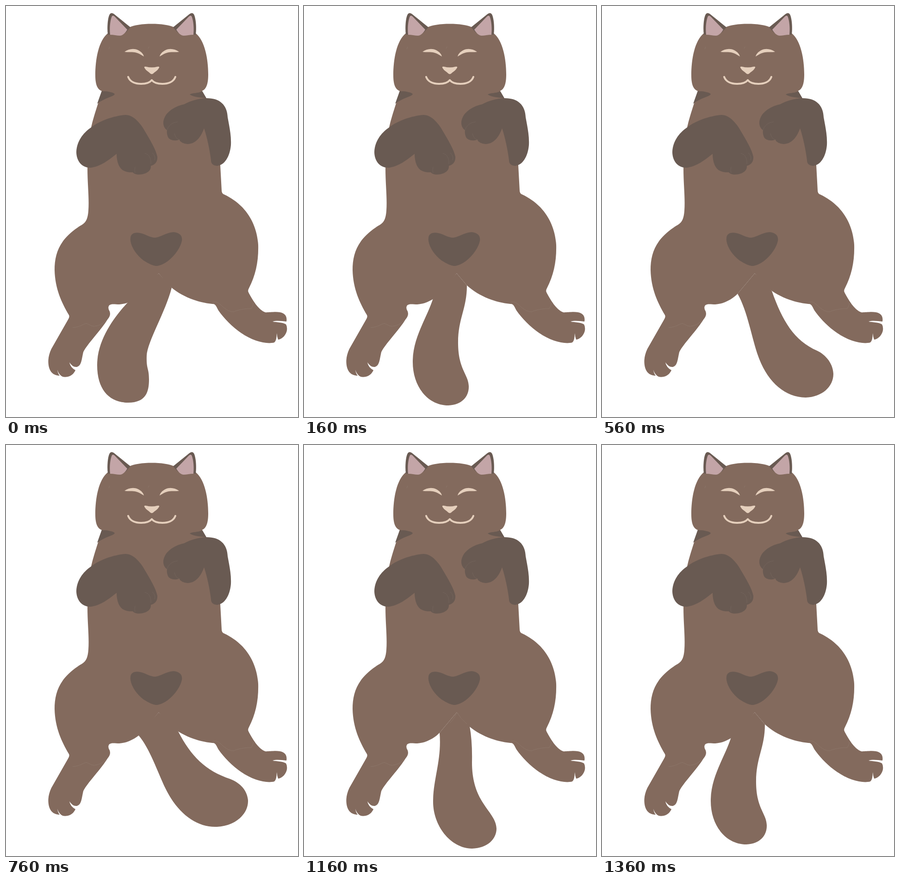
An HTML page for the animation above (1560 ms loop, 631 by 887 pixels).

```html
<!DOCTYPE html>
<html lang="en">
<head>
<meta charset="utf-8">
<title>Cat wagging its tail</title>
<style>
  html, body { margin: 0; width: 100%; height: 100%; overflow: hidden; background: #fff; }
  svg { display: block; width: 631px; height: 887px; }
  .fur { fill: #836a5d; }
  .dark { fill: #695a52; }
  .pink { fill: #c3a5a7; }
  .cream { fill: #e5cfbc; }
  .mouth { fill: none; stroke: #e5cfbc; stroke-width: 4; stroke-linecap: round; stroke-linejoin: round; }
  .seam { fill: none; stroke: #907a6e; stroke-width: .7; }
  .toe { fill: none; stroke: #75665e; stroke-width: .8; }

  .tail {
    --left: path("M262 641C235 670 197 720 197 775S225 856 264 856S309 832 309 806S303 785 304 755S345 660 358 608L330 577Z");
    --half-left: path("M279 631C265 675 235 715 235 768S267 862 312 862C342 861 357 842 356 820C355 795 334 785 333 730S352 655 352 603L330 577Z");
    --middle: path("M293 621C298 680 279 720 279 770S315 870 363 871C397 870 416 850 416 828C415 790 363 775 363 685Q364 640 358 607L330 577Z");
    --right: path("M293 621C315 660 323 715 338 757C358 812 395 844 440 845C475 844 500 822 500 794C499 770 482 752 465 744C415 722 390 680 367 615L330 577Z");
    --far-right: path("M286 626C311 655 327 705 345 742C371 795 412 826 456 824C495 822 524 797 523 767C521 743 503 728 485 721C431 703 400 672 372 618L330 577Z");
    animation: wag 1560ms step-end infinite;
  }
  .root { opacity: 0; animation: root 1560ms step-end infinite; }

  @keyframes wag {
    0%, 100% { d: var(--left); }
    10.2564%, 87.1795% { d: var(--half-left); }
    23.0769%, 74.359% { d: var(--middle); }
    35.8974%, 61.5385% { d: var(--right); }
    48.7179% { d: var(--far-right); }
  }
  @keyframes root {
    0%, 35.8974%, 87.1795%, 100% { opacity: 0; }
    23.0769%, 74.359% { opacity: 1; }
  }
</style>
</head>
<body>
<svg viewBox="0 0 631 887" xmlns="http://www.w3.org/2000/svg">
  <defs>
    <g id="ear">
      <path class="dark" d="M220 62C218 45 220 25 224 18Q227 13 233 17L269 46L258 58Z"/>
      <path class="pink" d="M225 62C223 45 226 28 229 22Q232 19 236 24L262 51C258 58 252 64 246 64S232 62 225 62Z"/>
    </g>
    <path id="eye" class="cream" d="M256 99C265 92 277 91 285 95S297 104 298 109C290 104 285 101 278 100S263 100 256 99Z"/>
    <path id="smile" class="mouth" d="M264 153C268 164 280 168 292 168S311 165 315 160"/>
  </defs>

  <path class="fur tail"/>

  <g id="torso">
    <path class="fur" d="M208 180C203 200 190 235 184 262C178 290 175 325 176 350C176 385 180 415 178 442C176 470 166 470 155 478C115 505 105 535 105 570C106 610 120 640 136 667L219 677C225 670 226 665 224 659Q219 651 223 646C228 642 235 644 245 644C265 643 285 630 293 621L330 577L352 603C380 628 415 640 446 643L524 618Q522 614 525 609C540 580 546 550 545 515C541 460 510 425 472 407Q466 405 466 398L463 343L433 199L422 180Z"/>
  </g>
  <g id="left-leg">
    <path class="fur" d="M136 667Q138 671 134 677L98 740C91 755 90 768 93 780C97 794 106 797 116 798Q112 793 111 785Q113 793 119 798C124 802 131 801 137 799S148 791 150 786Q139 780 137 769Q144 780 153 779C163 776 163 765 167 747C175 730 205 700 219 677L215 640L150 650Z"/>
    <path class="seam" d="M144 694C155 694 165 688 173 685C180 687 185 692 192 691C203 690 212 683 219 677"/>
  </g>
  <g id="right-leg">
    <path class="fur" d="M446 643C453 642 455 650 459 657C475 680 505 710 540 722C555 727 570 729 580 726Q585 722 585 706Q586 714 588 720C598 719 606 708 607 700Q608 692 605 687C597 682 585 683 576 681C585 678 597 680 606 681C608 670 603 663 592 661S565 662 560 661C545 655 533 635 524 618L500 590L440 620Z"/>
    <path class="seam" d="M446 640C452 636 458 640 463 644C472 652 480 660 492 660C500 656 515 653 530 653Q535 645 534 640"/>
  </g>
  <path class="seam root" d="M315 600Q326 590 330 577Q338 590 352 602"/>

  <g id="markings" class="dark">
    <path d="M207 183C218 184 232 186 235 190C233 196 215 197 197 211Z"/>
    <path d="M424 184L433 199C420 198 404 196 397 191C402 187 414 189 424 184Z"/>
    <path d="M269 500C270 490 280 488 290 490C303 493 312 500 322 500C335 499 345 489 362 488C375 489 382 496 380 507C376 525 360 545 343 555Q332 561 324 561Q314 560 297 549C280 536 267 515 269 500Z"/>
  </g>

  <g id="left-paw">
    <path class="dark" d="M184 262C205 245 240 236 258 235C275 235 290 252 300 270C312 290 324 310 327 325C328 336 322 343 313 345C314 355 305 361 295 363S277 363 274 359C255 360 247 352 243 342Q239 332 239 319C225 330 205 347 182 349C162 349 152 332 152 315C153 293 165 275 184 262Z"/>
    <path class="toe" d="M279 347Q277 354 279 360M300 318C310 320 314 330 313 341M316 317Q324 324 321 333"/>
  </g>
  <g id="right-paw">
    <path class="dark" d="M432 199C460 198 478 212 479 240C483 262 487 280 486 300C484 325 472 344 456 345Q443 344 443 333C440 310 435 285 428 264C423 278 413 297 393 298Q378 297 374 288C372 291 352 293 349 280Q347 274 348 268C339 262 338 250 343 240C350 225 370 215 385 212C400 204 415 200 432 199Z"/>
    <path class="toe" d="M348 267C352 257 360 251 371 250M364 275Q366 287 376 289"/>
  </g>

  <g id="head">
    <path class="fur" d="M267 46C285 36 345 36 363 46L410 59C430 75 437 115 437 148C437 172 431 184 418 184H212C199 184 193 172 193 150C193 115 200 75 220 59Z"/>
    <use href="#ear"/>
    <use href="#eye"/>
    <use href="#smile"/>
    <g transform="matrix(-1 0 0 1 630 0)">
      <use href="#ear"/>
      <use href="#eye"/>
      <use href="#smile"/>
    </g>
    <path class="seam" d="M222 93L224 88M307 92L309 88"/>
    <path class="cream" d="M299 133Q298 130 303 131Q315 134 327 131Q332 130 331 133C328 139 322 142 319 145Q315 149 311 145C307 141 302 139 299 133Z"/>
  </g>
</svg>
</body>
</html>
```
